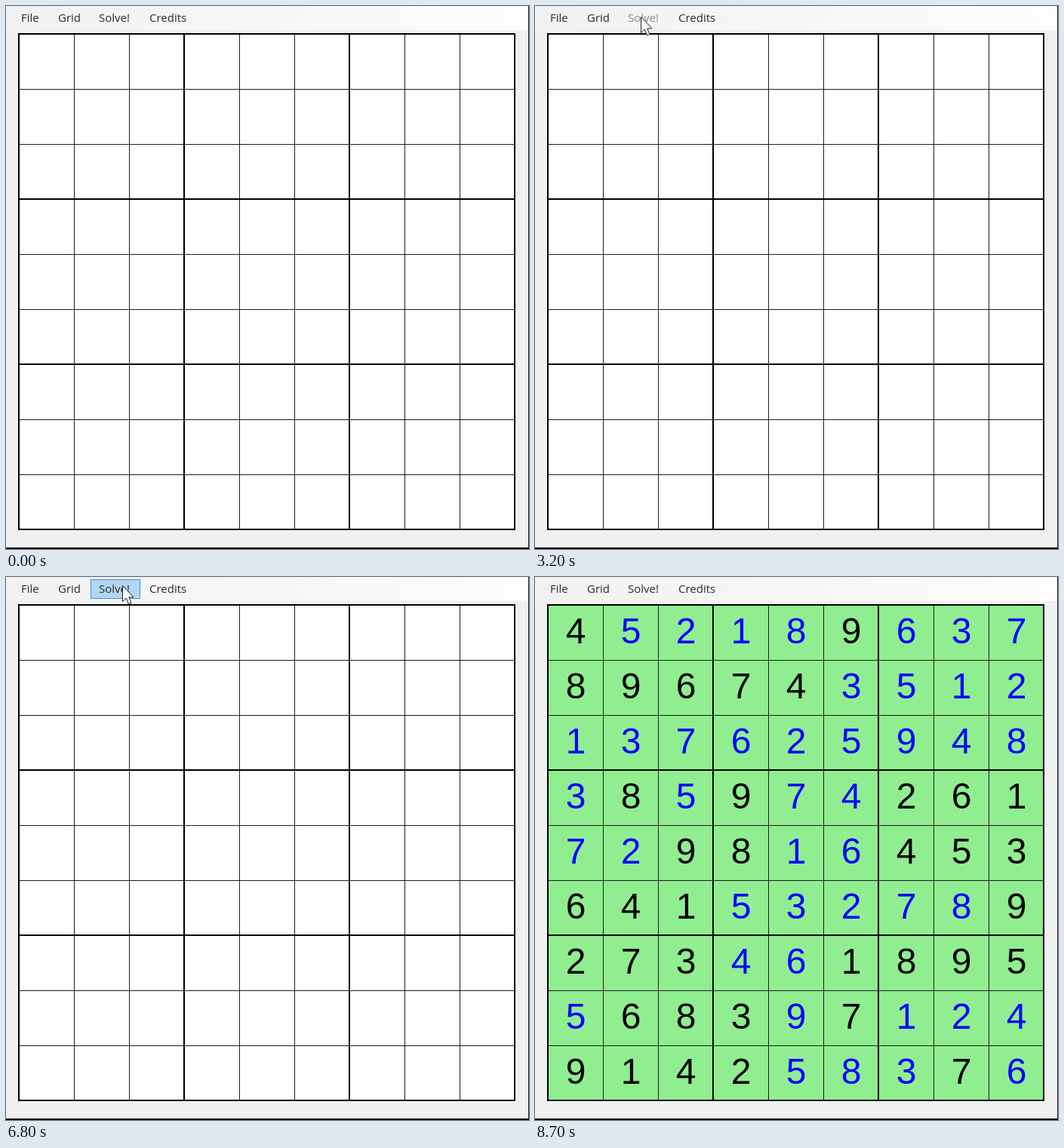
Animation of 693x720 px, one loop 8.73 s. Source, as an HTML page:

```html
<!DOCTYPE html>
<html lang="en">
<head>
<meta charset="utf-8">
<title>Sudoku solver</title>
<style>
html, body { margin: 0; width: 100%; height: 100%; overflow: hidden; }
svg { display: block; }
.menu { font: 15px "Open Sans", "Noto Sans", sans-serif; fill: #2a2a2a; }
.digits { font: 48px "Liberation Sans", Arial, sans-serif; text-anchor: middle; }
</style>
</head>
<body>
<svg width="693" height="720" viewBox="0 0 693 720">
  <defs>
    <linearGradient id="bar">
      <stop offset="0" stop-color="#f1f1f1"/>
      <stop offset="1" stop-color="#fdfdfd"/>
    </linearGradient>
  </defs>
  <rect width="693" height="720" fill="#f0f0f0"/>
  <rect width="693" height="32" fill="url(#bar)"/>
  <rect x="692" width="1" height="720" fill="#222"/>
  <rect y="718" width="693" height="2"/>
  <rect id="box" y="3.5" height="25"/>
  <g class="menu">
    <text x="20" y="21">File</text>
    <text x="69" y="21">Grid</text>
    <text id="solve" x="123" y="21">Solve!</text>
    <text x="190" y="21">Credits</text>
  </g>
  <rect id="board" x="17" y="37" width="657" height="657"/>
  <g id="digits" class="digits"></g>
  <path id="thin" fill="none" stroke="#1c1c1c"/>
  <path id="thick" fill="none" stroke="#000" stroke-width="2"/>
  <path id="cursor" d="M.5 .5V21.5L5.3 17 8.6 25 12 23.5 8.8 15.8H15Z" fill="#fff" stroke="#222"/>
</svg>
<script>
const LOOP = 8730, CELL = 73;
const GRID_HOVER = 720, GRID_OPEN = 900, GRID_PICK = 2660;
const SOLVE_READY = 5750, SOLVED = 7000, LEAVE = 8000;
const $ = id => document.getElementById(id);
const set = (id, attrs) => {
  for (const k in attrs) $(id).setAttribute(k, attrs[k]);
};

const solution = [
  '452189637', '896743512', '137625948',
  '385974261', '729816453', '641532789',
  '273461895', '568397124', '914258376'];
const givens = [
  '4....9...', '89674....', '.........',
  '.8.9..261', '..98..453', '641.....9',
  '273..1895', '.683.7...', '9142...7.'];

$('digits').innerHTML = solution.map((row, r) => [...row].map((n, c) =>
  `<text x="${54 + c * CELL}" y="${87.5 + r * CELL}" fill="${givens[r][c] === n ? '#000' : '#00f'}">${n}</text>`
).join('')).join('');

let thin = '', thick = '';
for (let i = 0; i < 10; i++) {
  const x = 17.5 + i * CELL, y = 37.5 + i * CELL;
  if (i % 3) thin += `M${x} 37V694M17 ${y}H674`;
  else thick += `M${x - .5} 36V695M16 ${y - .5}H675`;
}
set('thin', { d: thin });
set('thick', { d: thick });

// Pointer stops: time, x, y
const path = [
  [400, 92, -30], [780, 84, 14], [930, 84, 14], [1300, 102, 70],
  [1500, 102, 70], [1800, 104, 38], [2740, 104, 38], [3080, 140, 14],
  [5600, 140, 14], [5950, 154, 11], [7750, 154, 11], [8300, 170, -30]];

function pointer(t) {
  const i = path.findIndex(p => p[0] > t);
  if (i < 1) return [0, -40];
  const [t0, x0, y0] = path[i - 1], [t1, x1, y1] = path[i];
  const u = (t - t0) / (t1 - t0), e = u * u * (3 - 2 * u);
  return [x0 + (x1 - x0) * e, y0 + (y1 - y0) * e];
}

function draw() {
  const t = performance.now() % LOOP, solved = t >= SOLVED;
  const during = (from, to) => t >= from && t < to;
  const [x, y] = pointer(t);
  const onGrid = during(GRID_HOVER, GRID_PICK), onSolve = during(SOLVE_READY, LEAVE);
  const open = during(GRID_OPEN, GRID_PICK);

  set('board', { fill: solved ? '#90ee90' : '#fff' });
  set('digits', { visibility: solved ? 'visible' : 'hidden' });
  set('solve', { fill: during(GRID_PICK, SOLVE_READY) ? '#8a8a8a' : '#2a2a2a' });
  set('box', {
    x: onGrid ? 57.5 : 112.5,
    width: onGrid ? 53 : 65,
    fill: open ? '#fbfbfb' : '#b3d7f3',
    stroke: open ? '#8a8a8a' : '#3c8fda',
    visibility: onGrid || onSolve ? 'visible' : 'hidden'
  });
  set('cursor', { transform: `translate(${Math.round(x)} ${Math.round(y)})` });
  requestAnimationFrame(draw);
}
draw();
</script>
</body>
</html>
```
